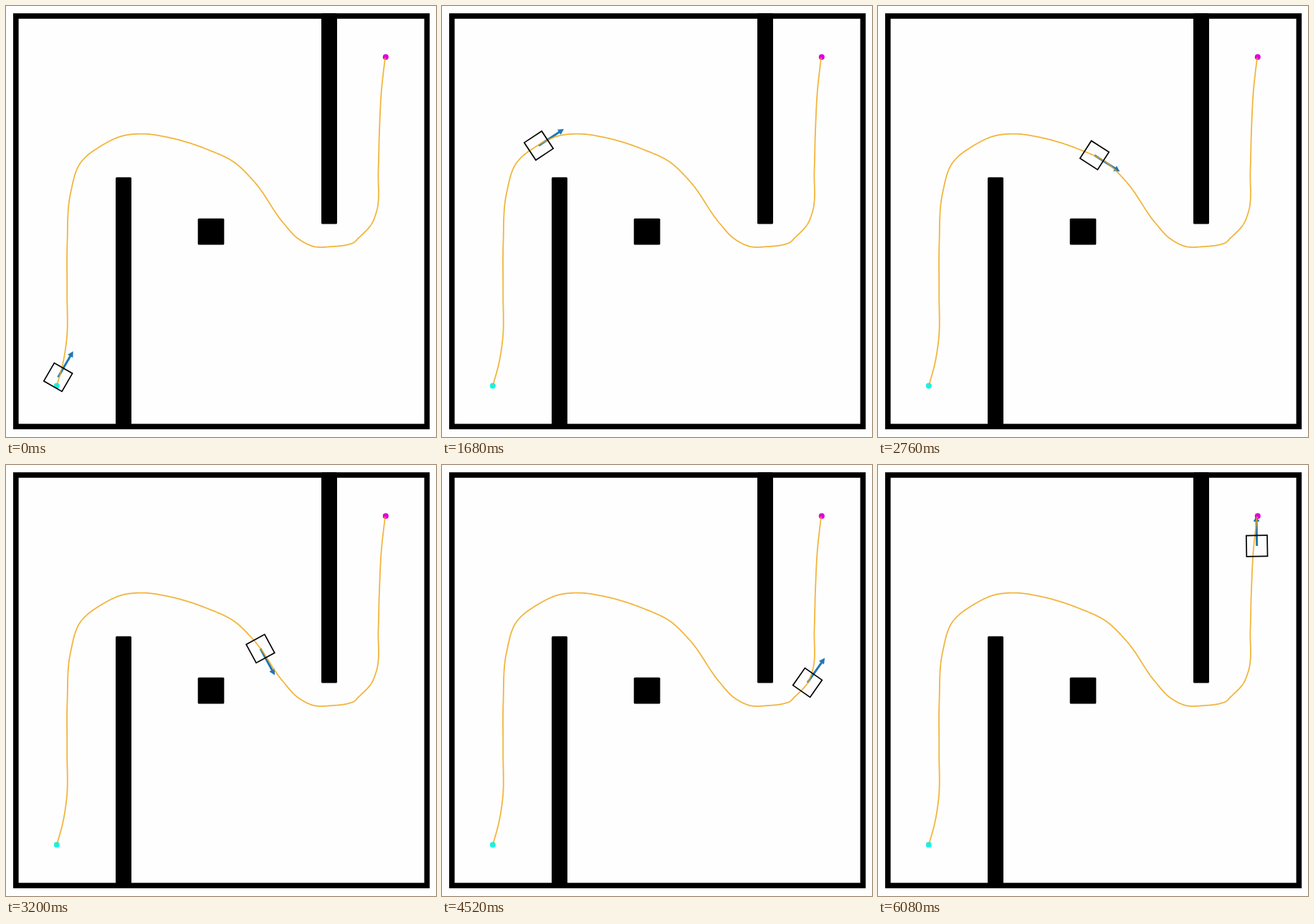
Recreate the animation shown at these times as an HTML page with a canvas. Size 600 by 602 pixels, loop 6.12 s.

```html
<!DOCTYPE html>
<html>
<head>
<meta charset="utf-8">
<style>
  html, body { margin: 0; width: 100%; height: 100%; overflow: hidden; background: #fefefe; }
  canvas { display: block; }
</style>
</head>
<body>
<canvas id="stage" width="600" height="602"></canvas>
<script>
const ctx = document.getElementById('stage').getContext('2d');
const LOOP = 6120, STEP = 40, DETAIL = 30;

// key points of the planned route, start to goal
const route = [
  [71, 530], [79, 501], [84.6, 466], [85.2, 400], [85.5, 330], [90, 262], [104, 219],
  [135, 194], [163, 181.3], [190, 178.6], [230, 184.3], [280, 200], [318, 218], [346, 245],
  [387, 303], [407, 324.5], [430, 336], [455, 336], [478, 333], [485, 330.6], [492, 324],
  [511, 303], [516.5, 289], [519.5, 230], [521, 175], [524, 117], [529, 72]
];

// robot at key moments: time, place, heading in degrees
const keys = [
  { t: 0, x: 72.7, y: 518.5, deg: -60 },
  { t: 840, x: 82.5, y: 321.3, deg: -94 },
  { t: 1680, x: 135, y: 195, deg: -33.5 },
  { t: 2280, x: 203, y: 179, deg: 7 },
  { t: 2560, x: 268, y: 194.5, deg: 18 },
  { t: 3200, x: 355, y: 256.5, deg: 61.5 },
  { t: 3840, x: 427, y: 335, deg: 10 },
  { t: 4520, x: 510, y: 304, deg: -55 },
  { t: 5600, x: 528.7, y: 113, deg: -91 },
  { t: LOOP, x: 528.7, y: 113, deg: -91 }
];

const gap = (a, b) => Math.hypot(b[0] - a[0], b[1] - a[1]);

// unit chords around a point, weighted towards the shorter one
function bend(i) {
  const p = route[i], a = route[i - 1] || p, c = route[i + 1] || p;
  const h1 = gap(a, p), h2 = gap(p, c);
  if (!h1 || !h2) return [0, 1].map(k => (c[k] - a[k]) / (h1 + h2));
  return [0, 1].map(k => ((p[k] - a[k]) / h1 * h2 + (c[k] - p[k]) / h2 * h1) / (h1 + h2));
}

// smooth line through the route, with running length s
const line = [{ x: route[0][0], y: route[0][1], s: 0 }];
for (let i = 0; i < route.length - 1; i++) {
  const a = route[i], b = route[i + 1], m = bend(i), n = bend(i + 1), h = gap(a, b);
  for (let j = 1; j <= DETAIL; j++) {
    const u = j / DETAIL, e = u * u * (3 - 2 * u);
    const [x, y] = [0, 1].map(k =>
      a[k] * (1 - e) + b[k] * e + h * u * (1 - u) * (m[k] * (1 - u) - n[k] * u));
    const last = line[line.length - 1];
    line.push({ x, y, s: last.s + Math.hypot(x - last.x, y - last.y) });
  }
}

const trail = new Path2D();
line.forEach(p => trail.lineTo(p.x, p.y));

// point and unit direction at length s
function along(s) {
  const i = Math.max(1, line.findIndex(p => p.s >= s));
  const a = line[i - 1], b = line[i], d = b.s - a.s, u = (s - a.s) / d;
  const dx = (b.x - a.x) / d, dy = (b.y - a.y) / d;
  return { x: a.x + dx * d * u, y: a.y + dy * d * u, dx, dy };
}

// turn each key place into progress s and sideways drift
for (const k of keys) {
  const far = p => Math.hypot(p.x - k.x, p.y - k.y);
  const near = line.reduce((a, b) => far(b) < far(a) ? b : a);
  const p = along(near.s), ex = k.x - p.x, ey = k.y - p.y;
  k.s = near.s + ex * p.dx + ey * p.dy;
  k.drift = ey * p.dx - ex * p.dy;
}

const slope = (i, f) => (keys[i + 1][f] - keys[i][f]) / (keys[i + 1].t - keys[i].t);

function rate(i, f) {
  if (i === 0) return slope(0, f);
  if (i === keys.length - 1) return 0;
  const a = slope(i - 1, f), b = slope(i, f);
  return a * b <= 0 ? 0 : 2 * a * b / (a + b);
}

// monotone cubic between keys
function ease(t, f) {
  let i = 0;
  while (i < keys.length - 2 && t >= keys[i + 1].t) i++;
  const a = keys[i], b = keys[i + 1], h = b.t - a.t, u = (t - a.t) / h;
  const e = u * u * (3 - 2 * u);
  return a[f] * (1 - e) + b[f] * e + h * u * (1 - u) * (rate(i, f) * (1 - u) - rate(i + 1, f) * u);
}

function inPose(t, paint) {
  const p = along(ease(t, 's')), drift = ease(t, 'drift');
  ctx.save();
  ctx.translate(p.x - p.dy * drift, p.y + p.dx * drift);
  ctx.rotate(ease(t, 'deg') * Math.PI / 180);
  paint();
  ctx.restore();
}

function block(x, y, w, h) {
  ctx.beginPath();
  ctx.roundRect(x, y, w, h, 1.5);
  ctx.fill();
}

function dot(x, y, color) {
  ctx.fillStyle = color;
  ctx.beginPath();
  ctx.arc(x, y, 4, 0, Math.PI * 2);
  ctx.fill();
}

function arrow() {
  ctx.fillStyle = '#1f77b4';
  ctx.fillRect(0, -1.5, 35, 3);
  ctx.beginPath();
  ctx.moveTo(34, -4.3);
  ctx.lineTo(42, 0);
  ctx.lineTo(34, 4.3);
  ctx.fill();
}

function body() {
  ctx.strokeStyle = '#000';
  ctx.lineWidth = 1.7;
  ctx.strokeRect(-14.6, -14.6, 29.2, 29.2);
}

function draw(t) {
  ctx.fillStyle = '#fefefe';
  ctx.fillRect(0, 0, 600, 602);

  ctx.strokeStyle = ctx.fillStyle = '#000';
  ctx.lineWidth = 7.6;
  ctx.strokeRect(13.8, 14, 573.6, 573.4);
  block(153, 239.3, 22, 351.7);
  block(440, 10.2, 22, 294.4);
  block(267.7, 296.7, 36.7, 36.7);

  inPose(t, arrow);
  dot(70.8, 530.5, '#0ff5ee');
  dot(529.8, 71.3, '#e000d8');
  ctx.strokeStyle = 'rgba(240, 165, 20, 0.82)';
  ctx.lineWidth = 1.8;
  ctx.stroke(trail);
  inPose(t, body);
}

function frame() {
  const t = performance.now() % LOOP;
  draw(Math.floor(t / STEP) * STEP);
  requestAnimationFrame(frame);
}
frame();
</script>
</body>
</html>
```
